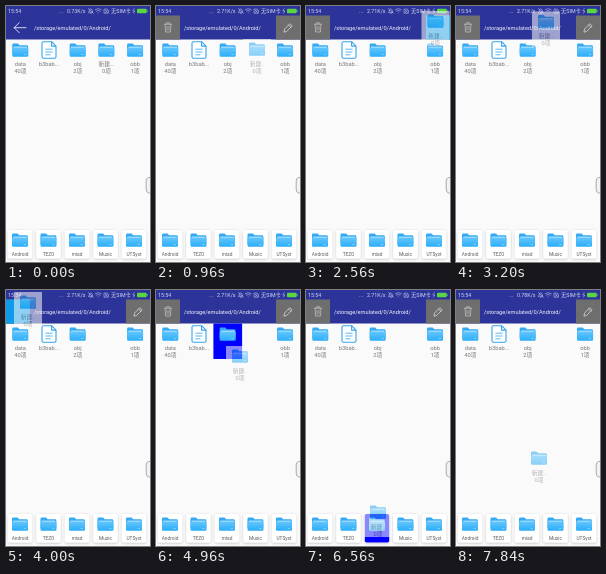
Write an HTML page that moves like this. It is 144 px wide and 256 px high and loops after 8000 ms.

```html
<!DOCTYPE html>
<html lang="zh">
<head>
<meta charset="utf-8">
<title>File manager drag and drop</title>
<style>
html, body { margin: 0; width: 100%; height: 100%; overflow: hidden; background: #fafafa; }
svg { display: block; width: 100vw; height: 100vh; }
text { font-family: Roboto, "Noto Sans CJK SC", "Noto Sans CJK", sans-serif; text-anchor: middle; }
.label { font-size: 5.7px; fill: #777; }
.card { font-size: 4.8px; fill: #5c5c5c; }
.status { font-size: 5.3px; fill: #d3d6ee; text-anchor: start; }
.path { font-size: 5.65px; fill: #f2f3fb; text-anchor: start; }
.line { fill: none; stroke: #fff; stroke-width: .8; stroke-linecap: round; stroke-linejoin: round; }
.thin { stroke-width: .55; stroke: #ccd0ec; }
.tool { stroke-width: .65; stroke: #ccc; }
.hover { fill: none; }
</style>
</head>
<body>
<svg viewBox="0 0 144 256" preserveAspectRatio="none">
  <defs>
    <linearGradient id="front" x1="0" y1="0" x2="0" y2="1">
      <stop offset="0" stop-color="#62c5fd"/>
      <stop offset="1" stop-color="#2badf8"/>
    </linearGradient>
    <filter id="shadow" x="-20%" y="-20%" width="140%" height="150%">
      <feDropShadow dx="0" dy=".7" stdDeviation=".8" flood-opacity=".25"/>
    </filter>
    <g id="folder">
      <path d="M-8-5.2Q-8-6.4-6.8-6.4H-2.4L-.8-4.8H6.6Q7.8-4.8 7.8-3.6V4H-8Z" fill="#35a9f2"/>
      <path d="M-6.7-3.4H6.7V3H-6.7Z" fill="#a9e0ff"/>
      <path d="M-8-2.2H8V5.6Q8 6.8 6.8 6.8H-6.8Q-8 6.8-8 5.6Z" fill="url(#front)"/>
      <path d="M3.6 4.6H6" stroke="#a5deff" stroke-width=".7"/>
    </g>
    <g id="file" fill="none" stroke="#35a4ea" stroke-width="1.1" stroke-linejoin="round">
      <path d="M-5.5-8.3H2.6L7-3.9V6.8Q7 8.3 5.5 8.3H-5.5Q-7 8.3-7 6.8V-6.8Q-7-8.3-5.5-8.3Z" fill="#fff"/>
      <path d="M2.6-8.3V-3.9H7"/>
      <path d="M-3.6-.8H3.6M-3.6 2H3.6M-3.6 4.8H1.5" stroke-width=".8"/>
    </g>
  </defs>
  <rect width="144" height="256" fill="#fafafa"/>
  <rect width="144" height="33.5" fill="#2c349a"/>

  <text class="status" x="2" y="7.2">15:54</text>
  <text class="status" x="53" y="7.2">...</text>
  <text class="status" id="speed" x="61" y="7.2"></text>
  <g class="line thin">
    <path d="M82.6 6.3H87L86.2 5V3.8Q84.8 1.9 83.4 3.8V5ZM84.3 7.3H85.3M82.4 2.5L87.2 7.2"/>
    <path d="M89.3 3.6Q92.3 1.5 95.3 3.6M90.5 5Q92.3 3.8 94.1 5M92.3 6.8V6.9"/>
    <path d="M98.4 3.1H101.2L102.4 4.2V7.2H98.4ZM99.2 4.2L101.5 6.4M101.5 4.2L99.2 6.4"/>
    <path d="M128.2 2.7L126.8 5H128.8L127.5 7.2"/>
  </g>
  <text class="status" x="105" y="7.2">无SIM卡</text>
  <rect x="131" y="2.8" width="9.6" height="4.4" rx=".8" fill="#59d641"/>
  <path d="M141.1 4.1V5.9" stroke="#59d641"/>

  <text class="path" x="28" y="23.7">/storage/emulated/0/Android/</text>
  <path id="back" class="line" d="M20 21.7H8.2M13.2 16.7L8.2 21.7L13.2 26.7"/>
  <g id="tools">
    <path d="M0 9.5H24V33.5H0ZM120 9.5H144V33.5H120Z" fill="#6e6e6e"/>
    <path class="line tool" d="M8.4 18.2H15.6M10.7 18V16.7H13.3V18M9.1 18.3L9.5 26H14.5L14.9 18.3M11 20.4V24M13 20.4V24"/>
    <path class="line tool" style="stroke: #eee" d="M128 25.8L128.6 23L133.9 17.7L136.1 19.9L130.8 25.2ZM132.6 19L134.8 21.2"/>
    <rect class="hover" y="9.5" width="24" height="24"/>
    <rect class="hover" x="120" y="9.5" width="24" height="24"/>
  </g>
  <g id="grid"></g>
  <g id="cards"></g>
  <path d="M144 171.5H142.6Q140.2 172 140.2 175V183Q140.2 186.5 142.6 187H144" fill="#f2f2f2" stroke="#aaa" stroke-width="1"/>
  <g id="drag" opacity=".55">
    <rect x="-14" y="-10" width="28" height="35" fill="#fafafa"/>
    <use href="#folder"/>
    <text class="label" y="16.6">新建..</text>
    <text class="label" y="23.6">0项</text>
  </g>
</svg>
<script>
const LOOP = 8000, STEP = 160, DRAG_START = 480;
const TOOL_HOVER = "#109bea", ITEM_HOVER = "#0000ff";
const $ = id => document.getElementById(id);

const items = [
  ["data", "40项"], ["b3bab...", ""], ["obj", "2项"], ["新建...", "0项"], ["obb", "1项"]
];
$("grid").innerHTML = items.map(([name, count], i) => `
  <g transform="translate(${14.3 + i * 28.7} 44)">
    <text class="label" y="16.2">${name}</text>
    <text class="label" y="23.2">${count}</text>
    <rect class="hover" x="-14.3" y="-10.5" width="28.7" height="35.5"/>
    <use href="#${i === 1 ? "file" : "folder"}"/>
  </g>`).join("");

const shortcuts = ["Android", "TEZO", "miad", "Music", "UTSyst"];
const cardShape = 'x="-12.2" y="-10" width="24.4" height="28.5" rx="1.8"';
$("cards").innerHTML = shortcuts.map((name, i) => `
  <g transform="translate(${14 + i * 28.5} 234)">
    <rect ${cardShape} fill="#fff" filter="url(#shadow)"/>
    <text class="card" y="15.6">${name}</text>
    <rect class="hover" ${cardShape}/>
    <use href="#folder"/>
  </g>`).join("");

const targets = [];
function addTarget(parent, x, y, w, h, color, index = 0) {
  const rect = parent.querySelectorAll(".hover")[index];
  targets.push({ rect, x, y, w, h, color });
}
addTarget($("tools"), 0, 0, 24, 33.5, TOOL_HOVER, 0);
addTarget($("tools"), 120, 0, 24, 33.5, TOOL_HOVER, 1);
[...$("grid").children].forEach((cell, i) => {
  if (i !== 1 && i !== 3) addTarget(cell, i * 28.7, 33.5, 28.7, 35.5, ITEM_HOVER);
});
[...$("cards").children].forEach((card, i) =>
  addTarget(card, 1.8 + i * 28.5, 222, 24.4, 32, ITEM_HOVER));

// Time and folder centre
const route = [
  [480, 100.5, 44], [960, 101, 43], [1760, 115, 24], [2560, 129.5, 15],
  [2880, 125, 16], [3520, 55, 15], [4000, 22, 12], [4480, 24, 22],
  [4960, 84, 66], [5440, 77, 105], [6080, 72, 192], [6560, 72, 222],
  [7040, 73, 223], [7520, 80, 195], [7840, 83, 168]
];

function position(t) {
  let i = route.findIndex(p => p[0] > t) - 1;
  if (i === -2) return route.at(-1).slice(1);
  i = Math.max(0, i);
  const [a, b] = [route[i], route[i + 1]];
  let u = Math.max(0, (t - a[0]) / (b[0] - a[0]));
  u += (u * u * (3 - 2 * u) - u) * .4;
  return [a[1] + (b[1] - a[1]) * u, a[2] + (b[2] - a[2]) * u];
}

function render(now) {
  const t = Math.floor(now % LOOP / STEP) * STEP;
  const dragging = t >= DRAG_START;
  const [x, y] = position(t);
  const show = (node, on) => node.style.display = on ? "" : "none";
  show($("back"), !dragging);
  show($("tools"), dragging);
  show($("drag"), dragging);
  show($("grid").children[3], !dragging);
  $("drag").setAttribute("transform", `translate(${x} ${y})`);
  for (const { rect, x: left, y: top, w, h, color } of targets) {
    const over = dragging && x >= left && x < left + w && y + 1 >= top && y + 1 < top + h;
    rect.style.fill = over ? color : "none";
  }
  $("speed").textContent = (t < 640 ? "0.73" : t < 7360 ? "2.71" : "0.78") + "K/s";
}

const start = performance.now();
function tick() {
  render(performance.now() - start);
  requestAnimationFrame(tick);
}
tick();
</script>
</body>
</html>
```
